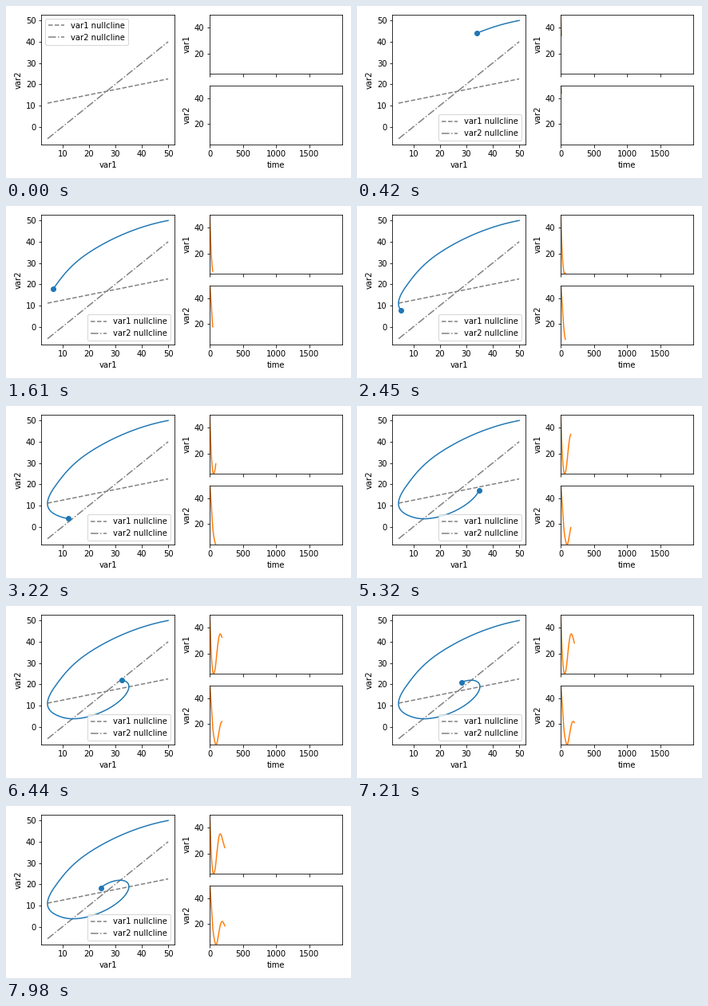
Write a matplotlib script that moves like this. It is 432 px wide and 216 px high and loops after 8000 ms.

```python
import numpy as np
import matplotlib.pyplot as plt
from matplotlib.animation import FuncAnimation

STEP_MS = 70
TICK_MS = 20
LOOP_MS = 8000
T_MAX = 2000


def simulate(steps, start=(50.0, 50.0), tau1=20.0, tau2=30.0):
    """Euler run of two coupled rate units with rectified input."""
    out = np.empty((steps, 2))
    x, y = start
    for i in range(steps):
        out[i] = x, y
        dx = (-x + max(1.25 * x - y + 10, 0)) / tau1
        dy = (-y + max(x - 10, 0)) / tau2
        x, y = x + dx, y + dy
    return out


run = simulate(T_MAX)
var1, var2 = run.T
time = np.arange(T_MAX)

fig = plt.figure(figsize=(6, 3), dpi=72)
phase = fig.add_subplot(1, 2, 1)
top = fig.add_subplot(2, 2, 2)
low = fig.add_subplot(2, 2, 4, sharex=top)

span = np.array([var1.min(), var1.max()])
phase.plot(span, 10 + 0.25 * span, "--", color="gray", label="var1 nullcline")
phase.plot(span, span - 10, "-.", color="gray", label="var2 nullcline")
phase.set(xlabel="var1", ylabel="var2",
          xticks=range(10, 51, 10), yticks=range(0, 51, 10))
pad = 0.05 * np.ptp(span)
phase.set_xlim(span[0] - pad, span[1] + pad)
low_y, high_y = span[0] - 10, var2.max()
pad = 0.05 * (high_y - low_y)
phase.set_ylim(low_y - pad, high_y + pad)
legend = phase.legend(loc="upper left")

path, = phase.plot([], [], color="C0")
dot, = phase.plot([], [], "o", color="C0")

traces = []
for ax, data, name in ((top, var1, "var1"), (low, var2, "var2")):
    ax.set(ylabel=name, xlim=(0, T_MAX - 1), ylim=(data.min(), data.max()),
           xticks=range(0, 1501, 500), yticks=(20, 40))
    traces.append((ax.plot([], [], color="C1")[0], data))
top.tick_params(labelbottom=False)
low.set_xlabel("time")
fig.tight_layout()


def draw(k):
    n = (k * TICK_MS + TICK_MS // 2) // STEP_MS
    end = 2 * n + 1 if n else 0
    path.set_data(var1[:end], var2[:end])
    dot.set_data(var1[:end][-1:], var2[:end][-1:])
    for line, data in traces:
        line.set_data(time[:end], data[:end])
    legend.set_loc("upper left" if n < 6 else "lower right")
    return path, dot


anim = FuncAnimation(fig, draw, frames=LOOP_MS // TICK_MS, interval=TICK_MS,
                     repeat=True, repeat_delay=0)
plt.show()
```
